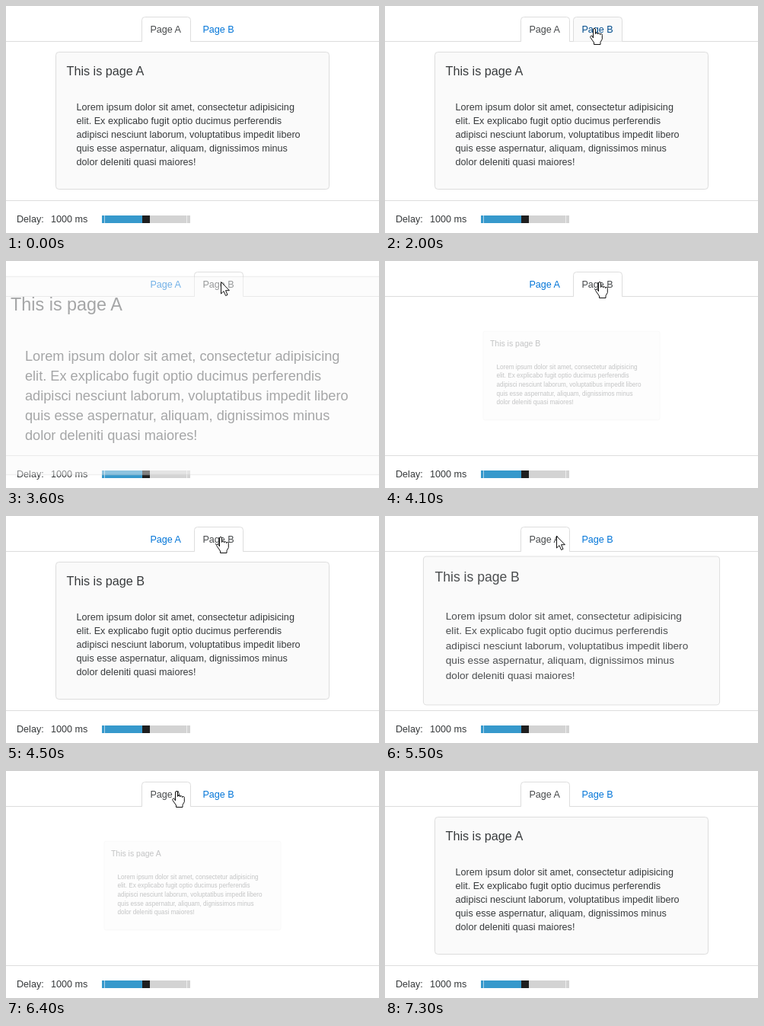
An HTML page that plays this animation: 490 by 298 pixels, repeating every 7900 ms.

```html
<!DOCTYPE html>
<html lang="en">
<head>
<meta charset="utf-8">
<title>Page transition</title>
<style>
  html, body { margin: 0; width: 100%; height: 100%; overflow: hidden; background: #fff; }
  svg { display: block; width: 100%; height: 100%; }
  text { font: 12.6px "Liberation Sans", Arial, sans-serif; fill: #373a3c; white-space: pre; }
  .title { font-size: 16.2px; }
  .edge { stroke: #ddd; }
  .tab path { fill: none; stroke: none; }
  .tab text { fill: #0275d8; }
  .tab.hover path { fill: #fafafa; stroke: #ddd; }
  .tab.hover text { fill: #014c8c; }
  .tab.active path { fill: #fff; stroke: #ddd; }
  .tab.active text { fill: #46494b; }
  .tab rect { fill: none; }
  .tab.active rect { fill: #fff; }
  #cursor path { fill: #fff; stroke: #111; stroke-linejoin: round; }
</style>
</head>
<body>
<svg viewBox="0 0 490 298">
  <path class="edge" d="M0 46.5H490M0 255.5H490"/>
  <g class="tab" id="tabA" transform="translate(178 14)">
    <path d="M.5 32.5V4.5a4 4 0 0 1 4-4H60.5a4 4 0 0 1 4 4V32.5"/>
    <rect x="1" y="31" width="63" height="2"/>
    <text x="11.4" y="21">Page A</text>
  </g>
  <g class="tab" id="tabB" transform="translate(247 14)">
    <path d="M.5 32.5V4.5a4 4 0 0 1 4-4H60.5a4 4 0 0 1 4 4V32.5"/>
    <rect x="1" y="31" width="63" height="2"/>
    <text x="11.4" y="21">Page B</text>
  </g>
  <text x="14" y="284">Delay:</text>
  <text x="59" y="284">1000 ms</text>
  <g id="slider">
    <rect x="126" y="275" width="53" height="10" fill="#3699cc"/>
    <rect x="189" y="275" width="53" height="10" fill="#d3d3d3"/>
    <rect x="179" y="275" width="10" height="10" fill="#1f1f1f"/>
    <path d="M129.5 275V285M237.5 275V285" stroke="#fff" stroke-opacity=".6"/>
  </g>
  <g id="panel">
    <rect class="edge" x="65.5" y="60.5" width="359" height="180" rx="4" fill="#fafafa"/>
    <text class="title" id="title" x="79.5" y="91"></text>
    <g id="body"></g>
  </g>
  <g id="cursor">
    <path id="arrow" d="M.5 .5V16L4 12.7 6.6 18.5 9 17.4 6.5 11.7H11.4Z"/>
    <path id="hand" d="M-1.5 13V2a1.5 1.5 0 0 1 3 0V7.5a1.5 1.5 0 0 1 3 .4 1.5 1.5 0 0 1 3 .7 1.4 1.4 0 0 1 2.8 .8V14.5L8 18.5V21.5H-.5V19L-5 12.5a1.6 1.6 0 0 1 2.2-2.2Z"/>
  </g>
</svg>
<script>
const LOOP = 7900, STEP = 100, FADE = 476;
const CENTER = [245, 150.5], END_SCALE = 1.8, START_SCALE = 0.5;
const LEAVE = [3336, 5450], ENTER = [3960, 6260];
const SHOW = 1200, HIDE = 7300;

// Cursor keys: time, x, y
const PATH = [
  [1200, 194, 272], [1500, 206, 165], [1800, 236, 23], [1900, 242, 30],
  [2000, 275, 29], [2100, 266, 31], [2200, 241, 31], [2300, 241, 31],
  [2500, 236, 82], [2700, 230, 149], [2900, 256, 108], [3100, 281, 50],
  [3200, 282, 27], [4800, 282, 27], [4900, 253, 28], [5000, 229, 28],
  [5100, 229, 28], [5200, 225, 26], [5500, 225, 26], [5600, 224, 26],
  [6700, 224, 26], [7000, 91, 129], [7200, 45, 273]
];
const LINES = [
  "Lorem ipsum dolor sit amet, consectetur adipisicing",
  "elit. Ex explicabo fugit optio ducimus perferendis",
  "adipisci nesciunt laborum, voluptatibus impedit libero",
  "quis esse aspernatur, aliquam, dignissimos minus",
  "dolor deleniti quasi maiores!"
];

const $ = id => document.getElementById(id);
const clamp = v => Math.max(0, Math.min(1, v));
const mix = (a, b, p) => a + (b - a) * p;
const show = (el, on) => el.setAttribute("visibility", on ? "visible" : "hidden");

LINES.forEach((line, i) => {
  const text = document.createElementNS("http://www.w3.org/2000/svg", "text");
  text.setAttribute("x", 92.6);
  text.setAttribute("y", 137 + 18 * i);
  text.textContent = line;
  $("body").append(text);
});

function cursorAt(t) {
  const i = PATH.findIndex(k => k[0] > t);
  if (i < 0) return PATH[PATH.length - 1].slice(1);
  if (i === 0) return PATH[0].slice(1);
  const a = PATH[i - 1], b = PATH[i], p = (t - a[0]) / (b[0] - a[0]);
  return [mix(a[1], b[1], p), mix(a[2], b[2], p)];
}

function panelAt(t) {
  for (let i = 0; i < 2; i++) {
    if (t < LEAVE[i] || t >= ENTER[i] + FADE) continue;
    if (t < ENTER[i]) {
      const p = clamp((t - LEAVE[i]) / FADE);
      return { scale: mix(1, END_SCALE, p), alpha: 1 - p };
    }
    const p = clamp((t - ENTER[i]) / FADE);
    return { scale: mix(START_SCALE, 1, p), alpha: p };
  }
  return { scale: 1, alpha: 1 };
}

function draw(t) {
  const active = t >= LEAVE[0] && t < LEAVE[1] ? "B" : "A";
  const page = t >= ENTER[0] && t < ENTER[1] ? "B" : "A";
  const leaving = LEAVE.some(s => t >= s && t < s + FADE);
  const visible = t >= SHOW && t < HIDE;
  const [x, y] = cursorAt(t);
  const over = (name, left) =>
    visible && !leaving && x >= left && x < left + 65 && y >= 14 && y < 46 ? name : "";
  const hover = over("A", 178) || over("B", 247);

  for (const name of ["A", "B"]) {
    const state = name === active ? " active" : name === hover ? " hover" : "";
    $("tab" + name).setAttribute("class", "tab" + state);
  }

  const { scale, alpha } = panelAt(t), [cx, cy] = CENTER;
  $("title").textContent = "This is page " + page;
  $("panel").setAttribute("opacity", alpha);
  $("panel").setAttribute("transform",
    `translate(${cx} ${cy}) scale(${scale}) translate(${-cx} ${-cy})`);

  $("cursor").setAttribute("transform", `translate(${Math.round(x)} ${Math.round(y)})`);
  show($("arrow"), visible && !hover);
  show($("hand"), visible && hover);
}

const start = performance.now();
function tick() {
  const t = (performance.now() - start) % LOOP;
  draw(Math.floor(t / STEP) * STEP);
  requestAnimationFrame(tick);
}
tick();
</script>
</body>
</html>
```
